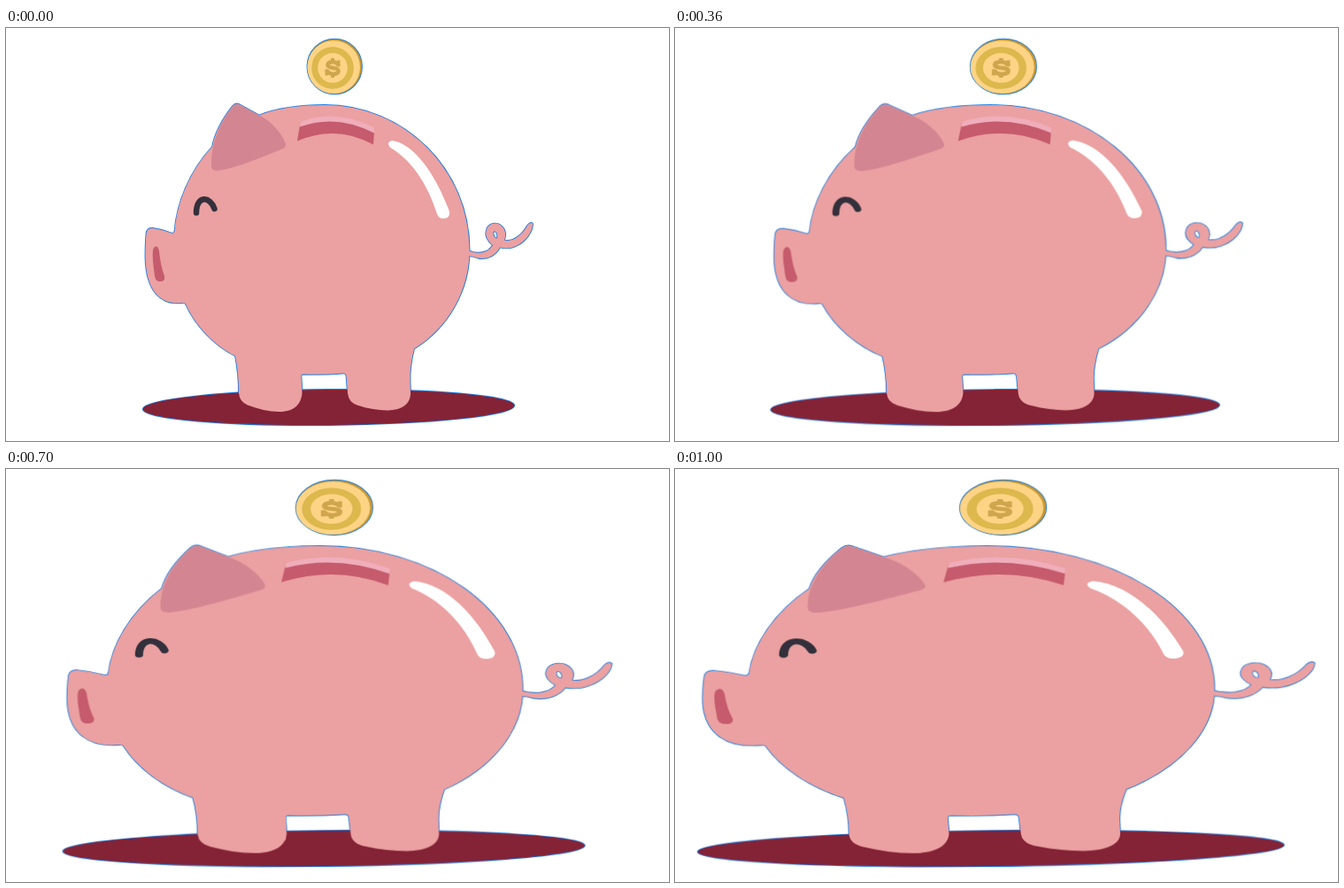
An HTML page that plays this animation: 749x466 px, repeating every 1020 ms.

```html
<!DOCTYPE html>
<html lang="en">
<head>
<meta charset="utf-8">
<title>Stretching piggy bank</title>
<style>
  html, body { margin: 0; width: 100%; height: 100%; overflow: hidden; background: #fff; }
  svg { display: block; width: 749px; height: 466px; }

  /* The stretch runs along an axis tilted slightly up to the right. */
  .bank {
    transform-box: view-box;
    transform-origin: 374.9px 233px;
    animation: stretch 1020ms steps(51, end) infinite;
  }
  @keyframes stretch {
    from { transform: rotate(-.848deg) scaleX(1) rotate(.848deg); }
    to { transform: rotate(-.848deg) scaleX(1.5906) rotate(.848deg); }
  }

  .outline { fill: none; stroke: #1f7de0; stroke-width: 1.8px; stroke-linejoin: round; }
  .edge { vector-effect: non-scaling-stroke; }
  .skin { fill: #eba0a1; }
  .floor { fill: #842236; }
  .ear { fill: #d38691; }
  .slot { fill: #c55b6c; }
  .lip { fill: #f0adbb; }
  .shine { fill: #fff; }
  .eye { fill: none; stroke: #33303c; stroke-width: 6.5; stroke-linecap: round; }
  .rim { fill: #c9982f; }
  .gold { fill: #fdd485; }
  .ring { fill: none; stroke: #dcb84d; stroke-width: 7; }
  .sign { fill: #cfa54d; }
  .curve { fill: none; stroke: #cfa54d; stroke-width: 4.6; }
</style>
</head>
<body>
<svg viewBox="0 0 749 466">
  <defs>
    <ellipse id="floor" class="edge" cx="364.5" cy="428" rx="209.7" ry="20" transform="rotate(-.55 364.5 428)"/>
    <path id="body" class="edge" d="M360 87
      C450 87 523.5 160 523.5 250
      C524 295 500 338 461 362
      C458 374 456 386 456.500 398 L457 412
      C457 424 448 431 431 431.500
      C420 431 410 430 398 426 Q387 423 386 412
      L384.500 393 Q384 389 381 389.500
      Q358 391.500 336 390.500 Q333 390.500 333.500 394 L334.500 411
      C334 424 326 433 309 433
      C297 433 285 430 273 425.500 Q264 422 263 412
      Q263 390 259 370
      C235 358 214 336 203 311.500 Q202 309.500 199 310
      C176 313 158 298 157.500 258
      Q157.500 243 158.500 232 Q159.500 225 166 226
      Q177 227.500 187 231.500 Q190 232.500 190.500 229
      C193 198 207 162 233 134
      C236 118 245 102 256 88 Q260 83.500 265 87
      L286 98.500
      C308 90 332 87 360 87Z"/>
    <path id="tail" class="edge" fill-rule="evenodd" d="M522 251
      C533 256 545 254 550 245
      C545 241 541 235 542.500 229
      C544 222 550 219.500 556 221
      C563 224 566 231 563 239.500
      C572 242 583 234 589 223 Q592.500 218 595 221
      C595 229 588 240 578 245
      C571 249 564 249 558 247.500
      C553 257 543 261.500 533 259.500 Q527 257 522 257Z
      M551 229.500 C553.500 228 556 233 555 237 C552.500 238.500 549 233 551 229.500Z"/>
    <circle id="coin" class="edge" cx="371.2" cy="43.500" r="30.800"/>
  </defs>

  <g class="bank">
    <g class="outline">
      <use href="#floor"/><use href="#body"/><use href="#tail"/><use href="#coin"/>
    </g>

    <use href="#floor" class="floor"/>
    <use href="#tail" class="skin"/>
    <use href="#body" class="skin"/>

    <path class="ear" d="M256 88.500 Q260 84 265 87.500 L286 98.500
      C298 104 312 118 316 131 Q316.500 134.500 312 136.500
      C288 146 260 158 240 161 Q231 162 232 153
      C232 128 243 105 256 88.500Z"/>
    <path class="slot" d="M332 110 Q373 96 416 117 L415 131.500 Q373 108.500 329 127.500Z"/>
    <path class="lip" d="M333.500 105.500 Q373 90.500 416 112.500 L416 118.500 Q373 96.500 332 111.500Z"/>
    <path class="shine" d="M436 127 C462 131 485 165 501 207
      Q502 214 495 215 Q489 215.500 487 210
      C476 175 457 148 434 135 Q429 129 436 127Z"/>
    <path class="eye" d="M215 208.500 C215 188 231 190 235.500 204"/>
    <path class="slot" d="M166 251 Q167 246 170 246.500 Q172 247 173 252
      C174 262 176 272 179 280 Q180 286 174 286 Q169 286 168 280
      C167 270 165 260 166 251Z"/>

    <use href="#coin" class="rim"/>
    <circle class="gold" cx="370.200" cy="44.100" r="29.800"/>
    <circle class="ring" cx="369" cy="45" r="20.300"/>
    <path class="curve" d="M375.500 42.500 C374 37 363.500 37 363.500 41.500
      C363.500 47 375.500 43 375.500 48.500 C375.500 53.500 364 53 362.500 47.500"/>
    <path class="sign" d="M374 36.500h3.500v7h-3.500z M360.500 46.500h3.500v7h-3.500z M367 34h4v5h-4z M367 51h4v5h-4z"/>
  </g>
</svg>
</body>
</html>
```
